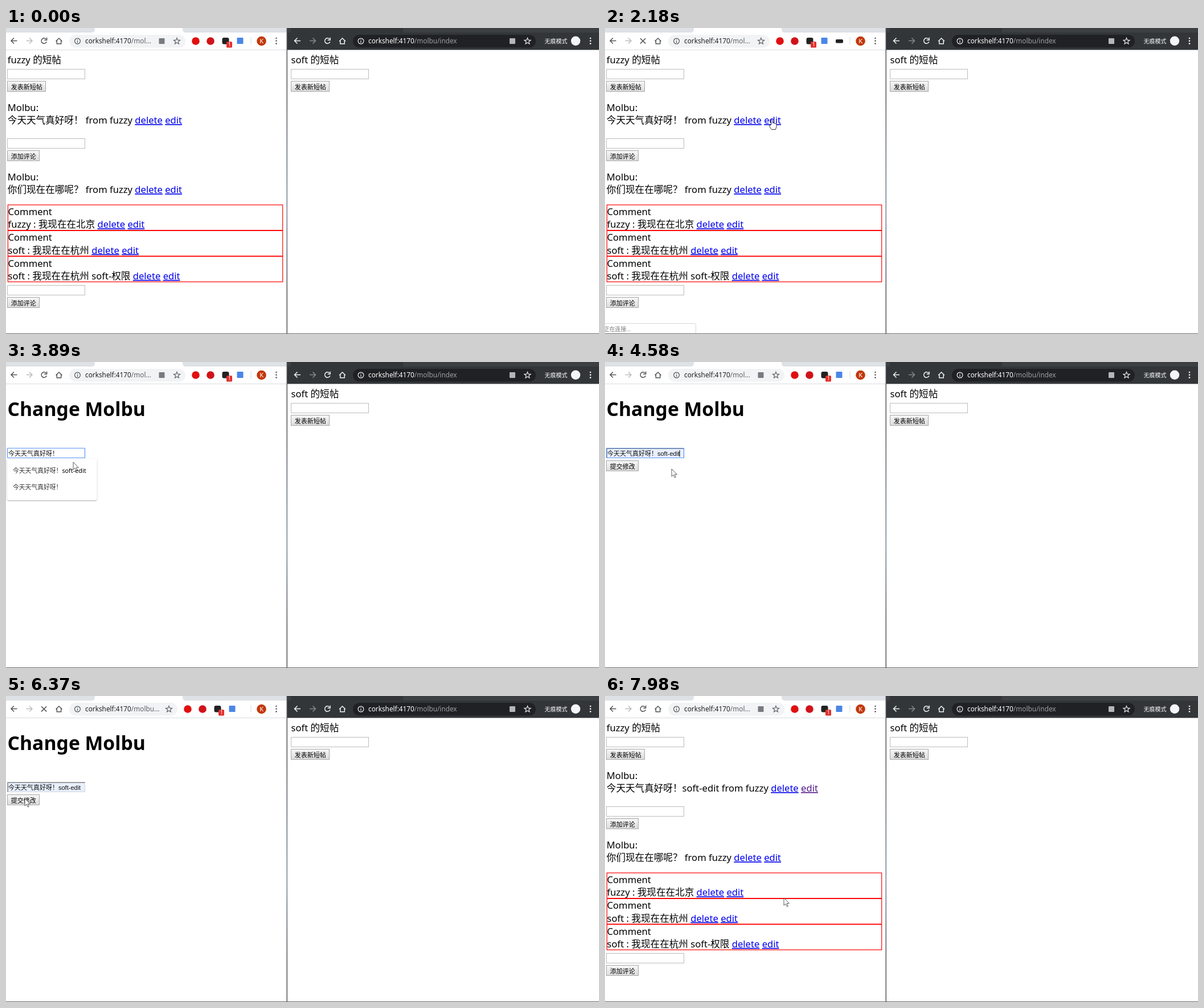
Animation of 1041x538 px, one loop 8000 ms. Source, as an HTML page:

```html
<!DOCTYPE html>
<html lang="zh-CN">
<head>
<meta charset="utf-8">
<title>Edit a post</title>
<style>
  html, body { margin: 0; width: 100%; height: 100%; overflow: hidden; background: #fff; }
  svg { display: block; width: 100vw; height: 100vh; }
  text { font: 16.6px 'Noto Sans', 'Noto Sans CJK SC', 'Noto Sans CJK', sans-serif; white-space: pre; }
  .small { font-size: 11px; }
  .hint { font-size: 10.8px; fill: #333; }
  .hint tspan { font-weight: 500; fill: #000; }
  .field { font: 11px 'Liberation Sans', 'Noto Sans CJK SC', 'Noto Sans CJK', sans-serif; fill: #111; }
  .url { font-size: 11.8px; }
  .status { font-size: 9.8px; fill: #777; }
  .mini { font-size: 10px; fill: #fff; }
  .heading { font-size: 33.7px; font-weight: bold; }
  .link { fill: #00e; text-decoration: underline; }
  .visited { fill: #551a8b; }
  .line { fill: none; stroke-width: 1.5; }
</style>
</head>
<body>
<svg id="stage" viewBox="0 0 1041 538" preserveAspectRatio="none"></svg>
<script>
const DURATION = 8000;
const HOST = 'corkshelf:4170';
const POST = '今天天气真好呀！';

const rect = (x, y, w, h, fill, extra = '') =>
  `<rect x="${x}" y="${y}" width="${w}" height="${h}" fill="${fill}" ${extra}/>`;
const circle = (x, y, r, fill, extra = '') =>
  `<circle cx="${x}" cy="${y}" r="${r}" fill="${fill}" ${extra}/>`;
const text = (x, y, content, cls = '', extra = '') =>
  `<text x="${x}" y="${y}" class="${cls}" ${extra}>${content}</text>`;
const path = (d, color, extra = '') => `<path d="${d}" class="line" stroke="${color}" ${extra}/>`;
const group = (id, content) => `<g id="${id}">${content}</g>`;
const links = (cls = '') =>
  ` <tspan class="link">delete</tspan> <tspan class="link ${cls}">edit</tspan>`;

const input = (x, y) => rect(x + .5, y + .5, 136, 17, '#fff', 'stroke="#bcbcbc"');
const button = (x, y, label) =>
  rect(x + .5, y + .5, label.length * 11 + 12, 18, 'url(#face)', 'stroke="#a6a6a6"') +
  text(x + 6.8, y + 14.6, label, 'small');

function star(cx, cy, color) {
  const points = Array.from({ length: 10 }, (_, i) => {
    const r = i % 2 ? 2.5 : 5.8, a = i * Math.PI / 5 - Math.PI / 2;
    return `${(cx + r * Math.cos(a)).toFixed(2)},${(cy + r * Math.sin(a)).toFixed(2)}`;
  });
  return `<polygon points="${points.join(' ')}" class="line" style="stroke-width:1.2" stroke="${color}"/>`;
}

const menuDots = (x, color) => [18, 22.7, 27.4].map(y => circle(x, y, 1.35, color)).join('');

function navigation(x, color, dim, id) {
  return `<g transform="translate(${x})">` +
    path('M19.5 22.5H9.5M14 17.5L9 22.5L14 27.5', color) +
    path('M35.5 22.5H45.5M41 17.5L46 22.5L41 27.5', dim) +
    group(id + 'Reload', path('M70.3 19.4A4.7 4.7 0 1 0 71.3 24M71.6 16.8V21.2H67.2', color)) +
    group(id + 'Stop', path('M62 18.2L71.2 27.4M71.2 18.2L62 27.4', color)) +
    path('M87.6 23.3L93 18L98.4 23.3M89.3 22.3V27.8H96.7V22.3', color) +
    circle(125.5, 23, 4.9, 'none', `stroke="${color}" stroke-width="1.2"`) +
    path('M125.5 22.5V26M125.5 20V21.2', color, 'style="stroke-width:1.2"') + '</g>';
}

function toolbar(id, end, urlPath, translate, mask) {
  const first = end + 18;
  return group(id,
    rect(111, 12, end - 111, 22.5, '#f1f3f4', 'rx="11.2"') +
    text(139, 27.2, `${HOST}<tspan fill="#5f6368">${urlPath}</tspan>`, 'url', 'fill="#202124"') +
    (translate ? rect(268.5, 18, 10, 10, '#777b80', 'rx="1"') : '') +
    star(end - 15, 23.2, '#5f6368') +
    circle(first, 23, 6.8, '#e01010') +
    circle(first + 26, 23, 6.8, '#d0131b') +
    rect(first + 46.5, 17, 12, 11.5, '#222', 'rx="3"') +
    rect(first + 54, 24, 10, 10.5, '#e2302e', 'rx="1.5"') +
    text(first + 57, 32.2, '1', 'mini', 'style="font-size:8.5px"') +
    rect(first + 72.5, 17, 11, 11, '#4a86e8', 'rx="1"') +
    (mask ? rect(405, 20, 13, 6.5, '#222', 'rx="2"') : ''));
}

const leftChrome =
  rect(0, 0, 493, 38, '#fff') + rect(0, 0, 493, 8, '#dee1e6') +
  '<path d="M150 8Q156 8 156 2V0H310V2Q310 8 316 8Z" fill="#fff"/>' +
  rect(0, 38, 493, 1, '#dadce0') +
  toolbar('barIdle', 315, '/mol...', true, false) +
  toolbar('barConnect', 289, '/mol...', false, true) +
  toolbar('barSubmit', 301, '/molbu...', false, false) +
  rect(429.5, 16, 1, 13, '#dadce0') +
  circle(448.5, 23, 8.3, '#c1370b') + text(445.2, 27, 'K', 'small', 'fill="#fff"') +
  menuDots(474.5, '#5f6368') +
  navigation(0, '#505357', '#bbbdc0', 'left');

const rightWindow =
  rect(494, 0, 547, 538, '#fff') + rect(494, 0, 547, 38.5, '#323639') +
  rect(697, 0, 344, 8, '#3c4043') + rect(494, 0, 6, 8, '#3c4043') +
  rect(609, 12, 321, 22.5, '#202124', 'rx="11.2"') +
  navigation(497.5, '#f1f3f4', '#85898d', 'right') +
  text(636, 27.2, `${HOST}<tspan fill="#9aa0a6">/molbu/index</tspan>`, 'url', 'fill="#fff"') +
  rect(884, 18, 10, 10, '#b4b7ba', 'rx="1"') + star(915.5, 23.2, '#e8eaed') +
  text(945.5, 26.8, '无痕模式', 'mini') + circle(1000, 22.7, 8.2, '#f4f5f6') +
  menuDots(1026, '#f1f3f4') +
  text(500.5, 62.2, 'soft 的短帖') + input(500, 72) + button(500, 93, '发表新短帖');

const comment = (i, line) => {
  const y = 311 + 45.35 * i;
  return rect(3.4, y, 482.3, 44.6, 'none', 'stroke="#f00" stroke-width="1.2"') +
    text(3.6, y + 18, 'Comment') + text(3.6, y + 40.2, line + links());
};

const listPage = group('list',
  text(2.8, 62.2, 'fuzzy 的短帖') + input(2, 72) + button(2, 93, '发表新短帖') +
  text(2.8, 146, 'Molbu:') +
  group('before', text(2.8, 168, `${POST} from fuzzy${links()}`)) +
  group('after', text(2.8, 168, `${POST}soft-edit from fuzzy${links('visited')}`)) +
  input(2, 194) + button(2, 215, '添加评论') +
  text(2.8, 268, 'Molbu:') + text(2.8, 290, `你们现在在哪呢？ from fuzzy${links()}`) +
  comment(0, 'fuzzy : 我现在在北京') +
  comment(1, 'soft : 我现在在杭州') +
  comment(2, 'soft : 我现在在杭州 soft-权限') +
  input(2, 452) + button(2, 473, '添加评论'));

const editPage = group('edit',
  text(2.5, 95, 'Change Molbu', 'heading') +
  input(2, 151) +
  group('filled', rect(2.5, 151.5, 136, 17, '#e8f0fe') + path('M3.2 169V152.2H138.5', '#8b8b8b')) +
  group('focus', rect(2.5, 151.5, 136, 17, 'none', 'stroke="#5b95f5" stroke-width="1.2" rx="1"')) +
  text(4, 164.6, `${POST}<tspan id="suffix">soft-edit</tspan>`, 'field') +
  rect(0, 155, 1, 11.5, '#000', 'id="caret"') +
  button(2, 173, '提交修改') +
  group('hints',
    rect(2, 170, 157.5, 73, '#fff', 'rx="2.5" filter="url(#shadow)"') +
    rect(2, 176, 157.5, 30, '#eee', 'id="hover"') +
    text(12, 194.6, POST + '<tspan>soft-edit</tspan>', 'hint') + text(12, 224.3, POST, 'hint')));

const status = group('status',
  rect(-5, 519.5, 164.5, 25, '#fff', 'rx="3" stroke="#d5d5d5"') +
  text(-2.2, 532.5, HOST + '/molbu/edit?molb...', 'status', 'id="target"') +
  text(-2, 532.5, '正在连接...', 'status', 'id="connecting"'));

const cursor = group('cursor',
  group('arrow', '<path d="M0 0V13.2L3.1 10.4L5.3 15.3L7.3 14.4L5.2 9.7H9.4Z" fill="#fff" stroke="#333" stroke-width=".8"/>') +
  group('hand', '<path d="M-1.3 9V.8Q0-.8 1.3.8V6Q3 5 3.8 6.6Q5.4 5.8 6.2 7.3Q8 7 8 9V13L6.3 17.5H-.7L-4.6 11.5Q-4.6 9-2.8 10Z" fill="#fff" stroke="#222" stroke-width=".9"/>') +
  group('beam', path('M-3-7.5H-.8L0-7L.8-7.5H3M0-7V7M-3 7.5H-.8L0 7L.8 7.5H3', '#222', 'style="stroke-width:1"')));

const stage = document.getElementById('stage');
stage.innerHTML = `<defs>
  <linearGradient id="face" x2="0" y2="1"><stop stop-color="#f7f7f7"/><stop offset="1" stop-color="#dcdcdc"/></linearGradient>
  <linearGradient id="seam" x2="0" y2="1"><stop offset=".2" stop-color="#3b3f43"/><stop offset=".6" stop-color="#5f7388"/><stop offset=".85" stop-color="#3b3f43"/></linearGradient>
  <filter id="shadow"><feDropShadow dx="0" dy="1" stdDeviation="1.2" flood-opacity=".35"/></filter>
  </defs>` + rect(0, 0, 1041, 538, '#fff') + listPage + editPage + leftChrome + status + rightWindow +
  rect(492.6, 0, 1.3, 538, 'url(#seam)') + rect(0, 537, 1041, 1, '#666') + cursor;

const part = Object.fromEntries([...stage.querySelectorAll('[id]')].map(e => [e.id, e]));
const show = (id, on) => { part[id].style.display = on ? '' : 'none'; };

// Pointer track: time, x, y
const track = [
  [380, 709, 300], [700, 520, 235], [1000, 330, 180], [1130, 291, 161], [1230, 291, 161],
  [1400, 293, 161], [2500, 293, 161], [3040, 98, 157], [3580, 98, 158], [3890, 118, 176],
  [4200, 117, 188], [4740, 117, 188], [4970, 268, 186], [5060, 268, 186], [5810, 33, 180],
  [6840, 33, 180], [7670, 338, 303], [7970, 314, 355], [8000, 314, 355]
];

function pointerAt(t) {
  const i = Math.max(1, track.findIndex(k => k[0] >= t));
  const [a, b] = [track[i - 1], track[i]];
  const p = Math.max(0, (t - a[0]) / (b[0] - a[0]));
  return [a[1] + (b[1] - a[1]) * p, a[2] + (b[2] - a[2]) * p];
}

function render(t) {
  const within = (a, b) => t >= a && t < b;
  const ramp = (a, b) => Math.min(1, Math.max(0, (t - a) / (b - a)));

  const editing = within(2300, 6600);
  show('list', !editing);
  show('edit', editing);
  show('before', t < 2300);
  show('after', t >= 6600);

  const connect = within(2030, 2400), submit = within(6370, 6640);
  show('barConnect', connect);
  show('barSubmit', submit);
  show('barIdle', !connect && !submit);
  const loading = within(1540, 2400) || within(6130, 6640);
  show('leftStop', loading);
  show('leftReload', !loading);
  show('rightStop', false);

  const preview = t >= 4100, focused = within(3190, 6130);
  show('filled', preview);
  show('suffix', preview);
  show('focus', focused);
  show('hints', within(3190, 4430));
  show('hover', preview);
  const focusStart = t < 4430 ? 3190 : 4430;
  show('caret', focused && (t - focusStart) % 1000 < 500);
  part.caret.setAttribute('x', preview ? 130.5 : 92);

  part.status.style.opacity = ramp(1070, 1300) * (1 - ramp(2560, 2800));
  show('target', t < 2030);
  show('connecting', t >= 2030);

  const hand = within(1070, 2500), beam = within(2960, 3660);
  const [x, y] = pointerAt(t);
  part.cursor.setAttribute('transform', `translate(${x.toFixed(1)} ${y.toFixed(1)})`);
  show('cursor', t >= 380);
  show('hand', hand);
  show('beam', beam);
  show('arrow', !hand && !beam);
}

const start = performance.now();
function tick() {
  render((performance.now() - start) % DURATION);
  requestAnimationFrame(tick);
}
tick();
</script>
</body>
</html>
```
